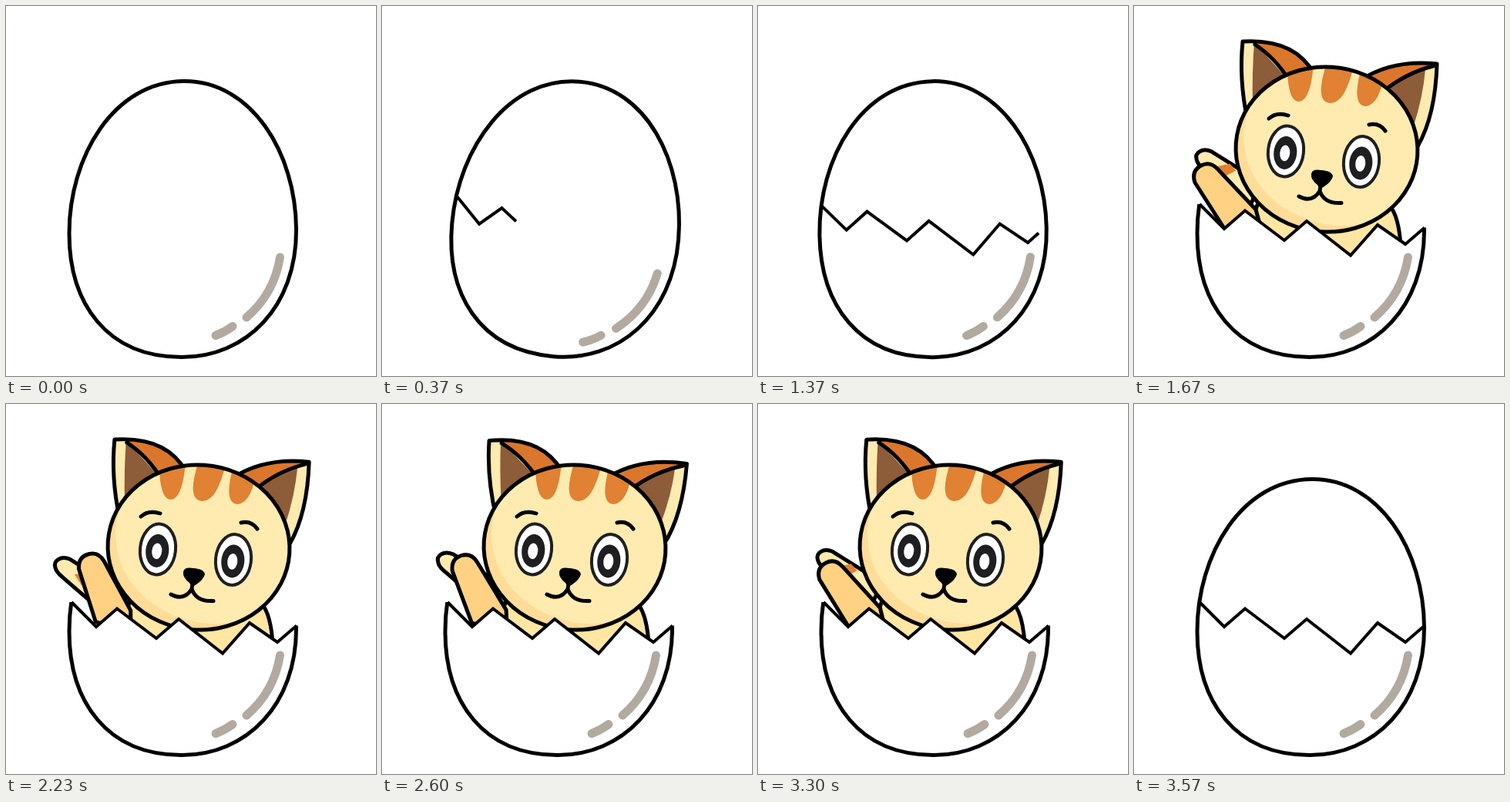
Write an HTML page that moves like this. It is 480 px wide and 480 px high and loops after 3610 ms.

```html
<!DOCTYPE html>
<html lang="en">
<head>
<meta charset="utf-8">
<title>Hatching kitten</title>
<style>
  html, body { margin: 0; width: 100%; height: 100%; overflow: hidden; background: #fff; }
  svg { display: block; width: 100vw; height: 100vh; }
  .ink { stroke: #000; stroke-width: 5; stroke-linejoin: round; stroke-linecap: round; }
  .none { fill: none; }
  .shell { fill: #fff; stroke: #000; stroke-width: 5; }
  .zig { fill: none; stroke: #000; stroke-width: 4; stroke-miterlimit: 8; }
  .cream { fill: #ffebb0; }
  .tan { fill: #ffd182; }
  .orange { fill: #db762d; }
  .stripe { fill: #e08133; }
  .brown { fill: #8d5c38; }
</style>
</head>
<body>
<svg viewBox="0 0 480 480">
  <defs>
    <path id="egg" d="M231 97.5C318 97 376 190 376.5 290C377 390 312 455.5 228 455.5C130 455.5 82 385 82 295C82 195 140 98 231 97.5Z"/>
    <path id="zig" d="M85 257L117 289L144 265.5L195 304L224 279L281 323.5L316 284L352 309L377 287.5"/>
    <clipPath id="above"><path id="abovePath"/></clipPath>
    <clipPath id="below"><path id="belowPath"/></clipPath>
    <ellipse id="head" cx="250" cy="186" rx="118" ry="107" transform="rotate(4 250 186)"/>
    <clipPath id="inHead"><use href="#head"/></clipPath>
    <g id="eye">
      <ellipse rx="23" ry="33" fill="#fff" stroke="#1f1f22" stroke-width="4"/>
      <ellipse cx="-.5" cy="2" rx="15" ry="21.5" fill="#1f1f22"/>
      <ellipse cx="-1" cy="2.5" rx="6.5" ry="10.500" fill="#fff"/>
    </g>
  </defs>

  <g clip-path="url(#above)">
    <g id="cat">
      <g id="tail">
        <path class="ink cream" d="M165 228L101 188C89 183 79 190 82 199C83 204 86 207 91 211L150 262Z"/>
        <path class="stripe" d="M107 208L125 204L133 213L116 222Z"/>
      </g>
      <path class="ink" fill="#ffe6a3" d="M165 245L125 350H346Q349 285 334 262Z"/>
      <g id="arm">
        <path class="ink tan" d="M158 264L108 211Q98 201 87 207Q74 214 79 229L118 290L165 290Z"/>
      </g>
      <g id="earL">
        <path class="cream" d="M141 46H158L175 130L147 147Q136 95 141 46Z"/>
        <path class="brown" d="M156 47L204 100L154 130Q153 85 156 47Z"/>
        <path class="orange" d="M156 46Q207 47 240 95L204 100Q182 66 156 48Z"/>
        <path class="ink none" d="M157 50Q182 66 202 97M147 147Q136 95 141 46Q208 42 233 87"/>
      </g>
      <g id="earR">
        <path class="cream" d="M393 75Q352 84 326 108L358 185L368 182Q391 142 393 75Z"/>
        <path class="brown" d="M378 82Q350 89 326 107L362 158Q375 118 378 82Z"/>
        <path class="orange" d="M294 96Q335 69 393 75Q350 86 322 112Z"/>
        <path class="ink none" d="M388 78Q352 87 322 112M294 96Q335 69 393 75Q391 142 368 182"/>
      </g>
      <g clip-path="url(#inHead)">
        <use href="#head" fill="#ffdc98"/>
        <ellipse class="cream" cx="270" cy="173" rx="128" ry="112" transform="rotate(5 270 173)"/>
        <path class="stripe" d="M199 78C199 108 204 124 214 124C226 123 231 100 233 74Z"/>
        <path class="stripe" d="M251 70C243 96 236 124 254 126C270 126 278 106 287 72Z"/>
        <path class="stripe" d="M296 78C289 100 284 129 300 130C313 129 321 112 324 90Z"/>
      </g>
      <use href="#head" class="ink none"/>
      <use href="#eye" transform="translate(197 188.500) rotate(6)"/>
      <use href="#eye" transform="translate(295 202) rotate(6)"/>
      <path class="ink none" d="M175 146Q185 137 200 142M305 154Q318 151 326 162"/>
      <path d="M230 218Q231 211 243 213Q257 214 258 221Q256 228 247 234Q241 239 238 232Q229 225 230 218Z"/>
      <path class="ink none" d="M242 233L241 240Q231 256 214 247M241 240Q247 257 269 255.500"/>
    </g>
  </g>

  <g id="open">
    <g clip-path="url(#below)"><use href="#egg" class="shell"/></g>
    <use href="#zig" class="zig"/>
    <g id="lid">
      <g clip-path="url(#above)"><use href="#egg" class="shell"/></g>
      <use href="#zig" class="zig"/>
    </g>
  </g>

  <g id="closed">
    <use id="whole" href="#egg" class="shell"/>
    <path id="crack" class="zig"/>
  </g>

  <path id="shine" fill="none" stroke="#b3aa9f" stroke-width="11" stroke-linecap="round" d="M355.500 326Q348 373 312 404M294 415.500Q284 423 272 427.500"/>
</svg>
<script>
const LOOP = 3610, OPEN = 1400, SHUT = 3560, SWING = 210;
const $ = id => document.getElementById(id);
const zig = $('zig').getAttribute('d');
$('abovePath').setAttribute('d', zig + 'H900V-400H-400V257Z');
$('belowPath').setAttribute('d', zig + 'H900V900H-400V257Z');
$('crack').setAttribute('d', zig);
const crackLength = $('crack').getTotalLength();

// time, x, egg turn, egg y, shine turn, shine y, crack turn, crack y, crack drawn
const rock = [
  [0, 0, 0, 0, 0, 0, 0, 0, 0],
  [600, 14.5, 7.3, 0, 11.6, 6.2, 8.7, 8, 156],
  [1250, -27, -9.3, 1.4, -4, 4, -9.8, -1.5, 205],
  [OPEN, 0, 0, 0, 0, 0, 0, 0, crackLength + 2]
];

const clamp = v => Math.min(1, Math.max(0, v));
const ease = v => (1 - Math.cos(Math.PI * clamp(v))) / 2;
const wave = (t, start, period) => (1 - Math.cos(2 * Math.PI * (t - start) / period)) / 2;
const move = (id, value) => $(id).setAttribute('transform', value);
const show = (id, on) => $(id).setAttribute('visibility', on ? 'visible' : 'hidden');

function pose(t) {
  let i = 0;
  while (i < rock.length - 2 && t >= rock[i + 1][0]) i++;
  const a = rock[i], b = rock[i + 1];
  const k = ease((t - a[0]) / (b[0] - a[0]));
  return a.map((v, n) => v + (b[n] - v) * k);
}

function draw(t) {
  const [, x, eggTurn, eggY, shineTurn, shineY, crackTurn, crackY, drawn] = pose(t);
  const tilt = (id, turn, y) => move(id, `translate(${x} ${y}) rotate(${turn} 230 276)`);
  tilt('whole', eggTurn, eggY);
  tilt('shine', shineTurn, shineY);
  tilt('crack', crackTurn, crackY);
  $('crack').setAttribute('stroke-dasharray', `${drawn} 900`);

  const hatched = t >= OPEN && t < SHUT;
  show('closed', !hatched);
  show('open', hatched);
  show('cat', hatched);
  if (!hatched) return;

  const u = Math.min(ease((t - OPEN) / SWING), ease((SHUT - t) / SWING));
  move('lid', `translate(${170 * u * u} ${-30 * u}) rotate(${112 * u} 377 288)`);
  const size = 0.6 + 0.4 * u;
  move('cat', `translate(235 ${300 + 190 * (1 - u)}) scale(${size}) translate(-235 -300)`);

  const wag = 1.15 * wave(t, 1645, 430);
  move('tail', `translate(${-19 * wag} ${14 * wag})`);
  move('arm', `rotate(${16.5 * wave(t, 1670, 400)} 145 280)`);
  const ear = wave(t, 1670, 530);
  move('earL', `rotate(${-4 * ear} 185 105)`);
  move('earR', `rotate(${6 * ear} 345 125)`);
}

const begin = performance.now();
function tick() {
  draw((performance.now() - begin) % LOOP);
  requestAnimationFrame(tick);
}
tick();
</script>
</body>
</html>
```
